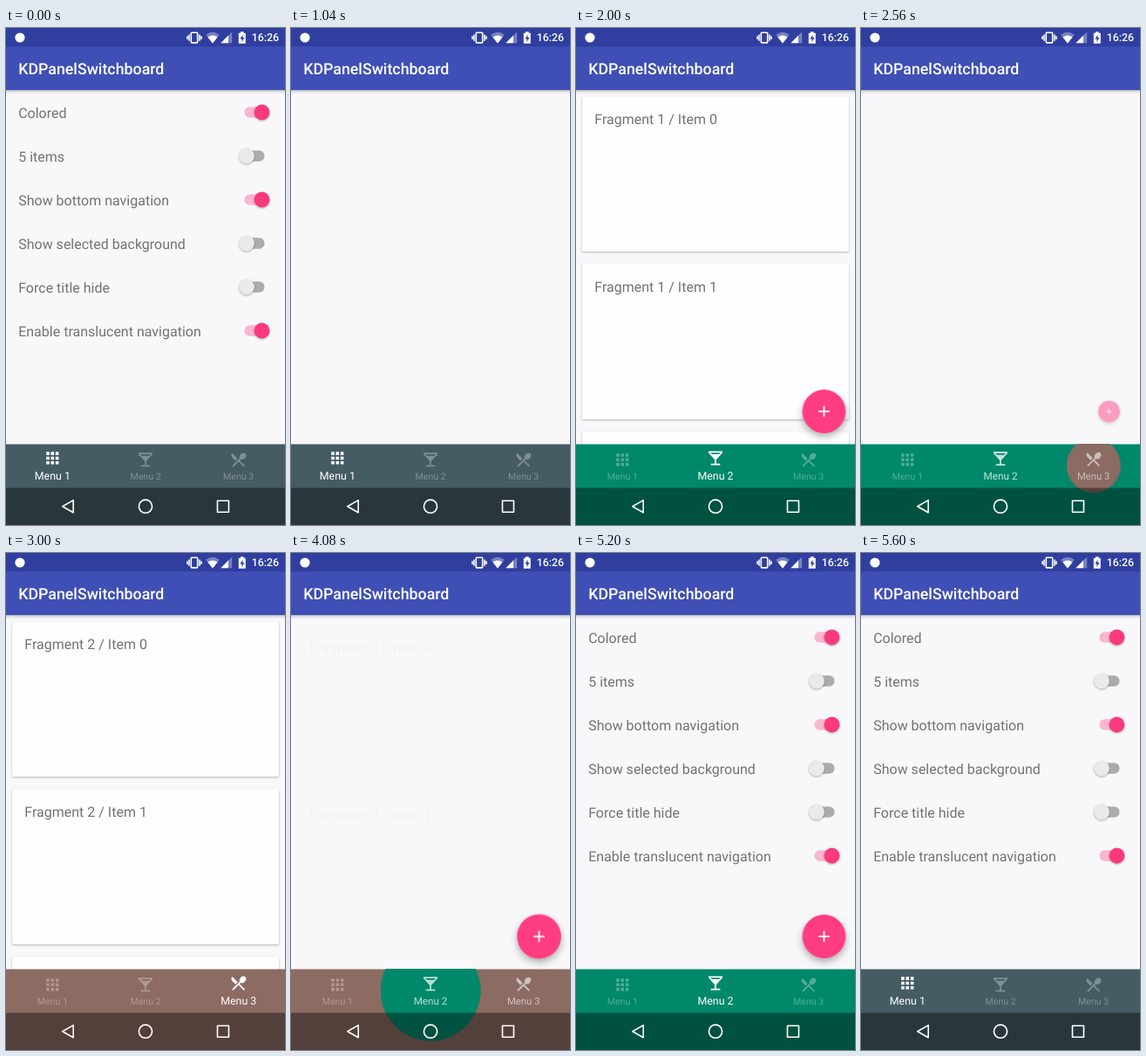
An HTML page for the animation above (5920 ms loop, 320x569 px).

```html
<!DOCTYPE html>
<html lang="en">
<head>
<meta charset="utf-8">
<title>Bottom tabs</title>
<style>
@property --on { syntax: '<number>'; inherits: true; initial-value: 0; }

html, body { margin: 0; width: 100%; height: 100%; overflow: hidden; background: #f8f7fa; }
svg { display: block; }
.stage { width: 100vw; height: 100vh; }
text { font-family: Roboto, sans-serif; text-rendering: geometricPrecision; }

.stage {
  --slate: #455c65; --green: #00886a; --brown: #8b6b62; --pink: #ff3d80;
  --ease: cubic-bezier(.37, 0, .63, 1);
}
.page { font-size: 16px; fill: #727274; }
.card { fill: #fefdff; filter: drop-shadow(0 1px 1px rgba(0, 0, 0, .28)); }
.thumb { filter: drop-shadow(0 1px 1px rgba(0, 0, 0, .3)); }
.dot { fill: var(--pink); filter: drop-shadow(0 4px 4px rgba(0, 0, 0, .3)); }
.line { fill: none; stroke: #fff; stroke-width: 1.6; stroke-linejoin: round; }

/* Everything shares one 5.92 s clock */
.settings { animation: settings 5.92s step-end infinite; }
.cards { animation: cards 5.92s var(--ease) infinite; }
.first { animation: first 5.92s step-end infinite; }
.second { animation: second 5.92s step-end infinite; }
.fab { animation: fab 5.92s linear infinite; }
.bar { animation: bar 5.92s step-end infinite; }
.ripple { animation: ripple 5.92s var(--ease) infinite; }

.tab { fill: #fff; fill-opacity: calc(.31 + .69 * var(--on)); }
.tab .icon { transform: translateY(calc((1 - var(--on)) * 1.8px)); }
.tab text {
  font-size: 12.4px; text-anchor: middle;
  transform: translateY(calc(517.3px - .8px * var(--on))) scale(calc(.857 + .143 * var(--on)));
}
.tab1 { animation: tab1 5.92s var(--ease) infinite; }
.tab2 { animation: tab2 5.92s var(--ease) infinite; }
.tab3 { animation: tab3 5.92s var(--ease) infinite; }

@keyframes settings {
  0% { opacity: 1; }
  17.568% { opacity: 0; }
  87.838%, 100% { opacity: 1; }
}
@keyframes cards {
  0%, 19.307% { opacity: 0; transform: translateY(4.4px); }
  24.713%, 41.215% { opacity: 1; transform: none; }
  41.216%, 42.956% { opacity: 0; transform: translateY(4.4px); }
  48.361%, 66.891% { opacity: 1; transform: none; }
  66.892%, 68.243% { opacity: 0; transform: translateY(4.4px); }
  73.649%, 87.837% { opacity: 1; transform: none; }
  87.838%, 100% { opacity: 0; transform: translateY(4.4px); }
}
@keyframes first {
  0% { opacity: 1; }
  41.216% { opacity: 0; }
  66.892%, 100% { opacity: 1; }
}
@keyframes second {
  0% { opacity: 0; }
  41.216% { opacity: 1; }
  66.892%, 100% { opacity: 0; }
}
@keyframes fab {
  0% { opacity: 0; transform: scale(0); }
  18.328%, 67.179% {
    opacity: 0; transform: scale(0);
    animation-timing-function: cubic-bezier(.333, 1.667, .667, 1);
  }
  23.395%, 72.247% { opacity: 1; transform: scale(1); }
  42.23%, 88.176% {
    opacity: 1; transform: scale(1);
    animation-timing-function: cubic-bezier(0, 0, .2, 1);
  }
  47.297%, 93.243%, 100% { opacity: 0; transform: scale(0); }
}
@keyframes bar {
  0% { fill: var(--slate); }
  23.649% { fill: var(--green); }
  47.297% { fill: var(--brown); }
  72.584% { fill: var(--green); }
  93.243%, 100% { fill: var(--slate); }
}
@keyframes ripple {
  0%, 18.581% { fill: var(--green); transform: translate(160px, 501px) scale(0); }
  23.649% { fill: var(--green); transform: translate(160px, 501px) scale(1); }
  23.65%, 42.23% { fill: var(--brown); transform: translate(266.7px, 501px) scale(0); }
  47.297% { fill: var(--brown); transform: translate(266.7px, 501px) scale(1); }
  47.298%, 67.517% { fill: var(--green); transform: translate(160px, 501px) scale(0); }
  72.584% { fill: var(--green); transform: translate(160px, 501px) scale(1); }
  72.585%, 88.176% { fill: var(--slate); transform: translate(53.3px, 501px) scale(0); }
  93.243% { fill: var(--slate); transform: translate(53.3px, 501px) scale(1); }
  93.244%, 100% { fill: var(--slate); transform: translate(53.3px, 501px) scale(0); }
}
@keyframes tab1 {
  0%, 18.581% { --on: 1; }
  21.115%, 88.176% { --on: 0; }
  90.709%, 100% { --on: 1; }
}
@keyframes tab2 {
  0%, 18.581% { --on: 0; }
  21.115%, 42.23% { --on: 1; }
  44.764%, 67.517% { --on: 0; }
  70.05%, 88.176% { --on: 1; }
  90.709%, 100% { --on: 0; }
}
@keyframes tab3 {
  0%, 42.23% { --on: 0; }
  44.764%, 67.517% { --on: 1; }
  70.05%, 100% { --on: 0; }
}
</style>
</head>
<body>
<svg class="stage" viewBox="0 0 320 569">
  <defs>
    <linearGradient id="shade" x2="0" y2="1">
      <stop stop-opacity=".26"/>
      <stop offset=".4" stop-opacity=".08"/>
      <stop offset="1" stop-opacity="0"/>
    </linearGradient>
    <clipPath id="barClip"><path d="M0 476.5h320V569H0z"/></clipPath>
    <g id="on">
      <rect x="273.5" y="-6.2" width="23" height="12.4" rx="6.2" fill="#ff3d80" fill-opacity=".35"/>
      <circle class="thumb" cx="293.5" r="8.9" fill="#fb3a7c"/>
    </g>
    <g id="off">
      <rect x="273.5" y="-6.2" width="23" height="12.4" rx="6.2" fill="#acabae"/>
      <circle class="thumb" cx="276" r="8.9" fill="#eae9eb"/>
    </g>
  </defs>

  <rect width="320" height="569" fill="#f8f7fa"/>

  <g class="page settings">
    <text x="14.2" y="102.6">Colored</text>
    <text x="14.2" y="152.6">5 items</text>
    <text x="14.2" y="202.6">Show bottom navigation</text>
    <text x="14.2" y="252.6">Show selected background</text>
    <text x="14.2" y="302.6">Force title hide</text>
    <text x="14.2" y="352.6">Enable translucent navigation</text>
    <use href="#on" y="96.5"/>
    <use href="#off" y="146.5"/>
    <use href="#on" y="196.5"/>
    <use href="#off" y="246.5"/>
    <use href="#off" y="296.5"/>
    <use href="#on" y="346.5"/>
  </g>

  <g class="page cards">
    <rect class="card" x="7.1" y="78.2" width="305.8" height="177.8" rx="1.8"/>
    <rect class="card" x="7.1" y="270.2" width="305.8" height="177.8" rx="1.8"/>
    <rect class="card" x="7.1" y="462.2" width="305.8" height="177.8" rx="1.8"/>
    <g class="first">
      <text x="21.3" y="109.8">Fragment 1 / Item 0</text>
      <text x="21.3" y="301.8">Fragment 1 / Item 1</text>
    </g>
    <g class="second">
      <text x="21.3" y="109.8">Fragment 2 / Item 0</text>
      <text x="21.3" y="301.8">Fragment 2 / Item 1</text>
    </g>
  </g>

  <!-- App bar -->
  <rect y="71" width="320" height="5" fill="url(#shade)"/>
  <rect width="320" height="71" fill="#3f4fb5"/>
  <rect width="320" height="21.3" fill="#303f9f"/>
  <text x="14.2" y="53.4" font-size="17.8" font-weight="500" fill="#fff">KDPanelSwitchboard</text>

  <!-- Status icons -->
  <g fill="#fff">
    <circle cx="16" cy="11" r="5.6"/>
    <rect class="line" x="212.3" y="5.3" width="7.4" height="11.6" rx=".8"/>
    <path class="line" stroke-width="1.3" d="M210 7.5v7.2M222 7.5v7.2M208 9.2v3.8M224 9.2v3.8"/>
    <path fill-opacity=".35" d="M237 17.6 229.2 7.8Q237 1.8 244.8 7.8z"/>
    <path d="M237 17.6 231.4 10.6Q237 6.4 242.6 10.6z"/>
    <path fill-opacity=".35" d="M259.2 4.4v12.8h-12.8z"/>
    <path d="M255 8.6v8.6h-8.6z"/>
    <path d="M269 4.3h3.6v1.4h2.2v12.1h-8V5.700h2.200z"/>
    <path fill="#303f9f" d="M271.500 7.600l-3 4.900h2v3.500l3-4.900h-2z"/>
    <text x="281.700" y="15.300" font-size="12.400" font-weight="500">16:26</text>
  </g>

  <g transform="translate(284.500 439)">
    <g class="fab">
      <circle class="dot" r="24.900"/>
      <path d="M-6.200 0H6.200M0-6.200V6.200" stroke="#fff" stroke-width="1.800"/>
    </g>
  </g>

  <!-- Bottom bar -->
  <g clip-path="url(#barClip)">
    <rect class="bar" y="476.500" width="320" height="92.500"/>
    <circle class="ripple" r="320"/>
  </g>
  <g transform="translate(53.300 0)">
    <g class="tab tab1">
      <g class="icon"><path transform="translate(-10.670 481.800) scale(.889)" d="M4 8h4V4H4v4zm6 12h4v-4h-4v4zm-6 0h4v-4H4v4zm0-6h4v-4H4v4zm6 0h4v-4h-4v4zm6-10v4h4V4h-4zm-6 4h4V4h-4v4zm6 6h4v-4h-4v4zm0 6h4v-4h-4v4z"/></g>
      <text>Menu 1</text>
    </g>
  </g>
  <g transform="translate(160 0)">
    <g class="tab tab2">
      <g class="icon"><path transform="translate(-10.670 481.800) scale(.889)" d="M21 5V3H3v2l8 9v5H6v2h12v-2h-5v-5l8-9zM7.430 7L5.660 5h12.690l-1.780 2H7.430z"/></g>
      <text>Menu 2</text>
    </g>
  </g>
  <g transform="translate(266.700 0)">
    <g class="tab tab3">
      <g class="icon"><path transform="translate(-10.670 481.800) scale(.889)" d="M8.100 13.340l2.830-2.830L3.910 3.500c-1.560 1.560-1.560 4.090 0 5.660l4.190 4.180zm6.780-1.810c1.530.71 3.680.21 5.270-1.380 1.910-1.910 2.280-4.650.81-6.120-1.460-1.460-4.200-1.100-6.120.81-1.590 1.590-2.090 3.740-1.380 5.270L3.700 19.870l1.410 1.410L12 14.410l6.880 6.880 1.410-1.410L13.410 13l1.470-1.470z"/></g>
      <text>Menu 3</text>
    </g>
  </g>

  <!-- System keys -->
  <rect y="526.500" width="320" height="42.500" fill-opacity=".4"/>
  <g class="line">
    <path d="M64.800 547.700 77.200 540.600V554.800z"/>
    <circle cx="160" cy="547.700" r="7.600"/>
    <rect x="242.500" y="541.300" width="13" height="13"/>
  </g>
</svg>
</body>
</html>
```
